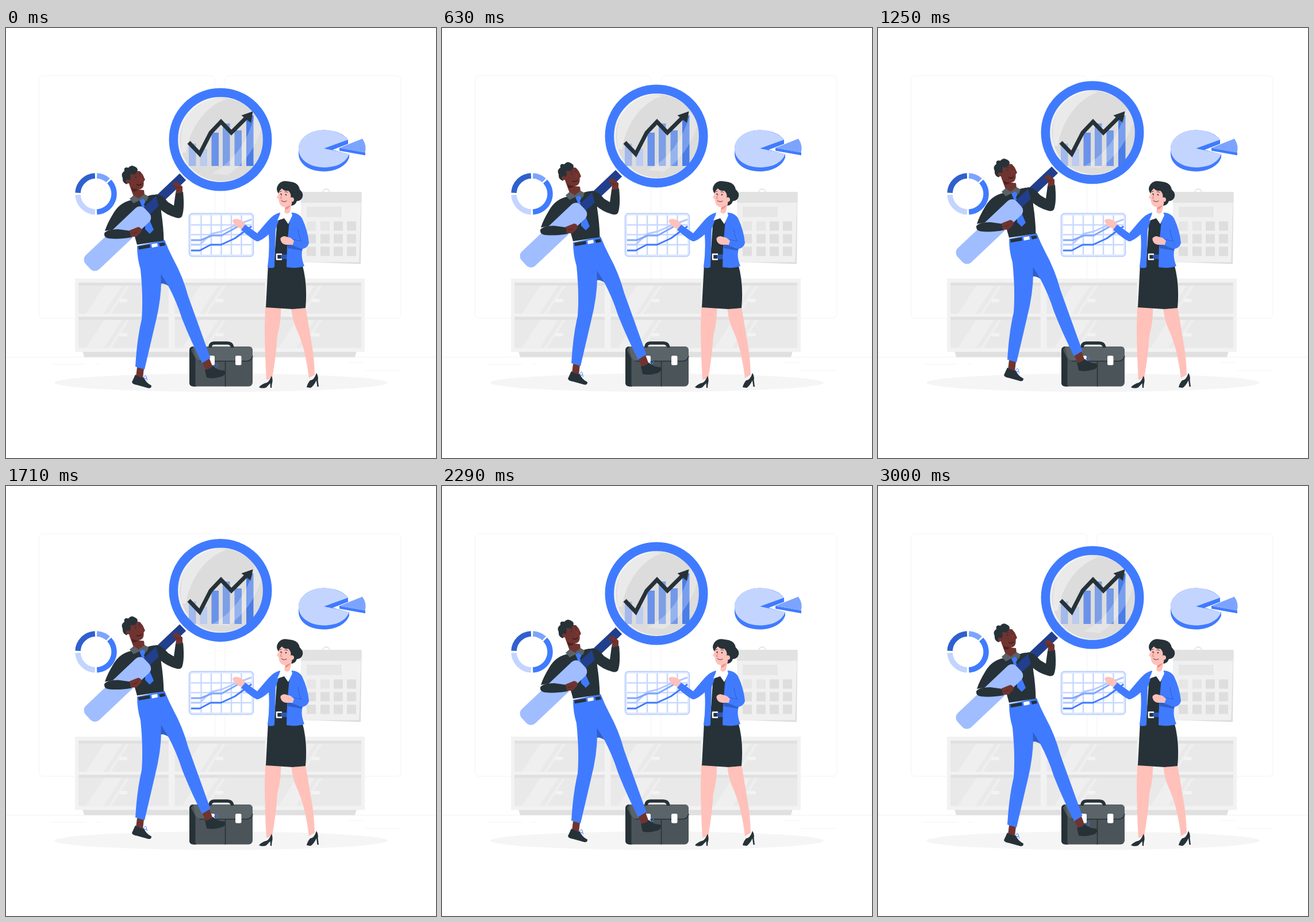
Write an HTML page that moves like this. It is 748 by 748 pixels and loops after 3040 ms.

```html
<!DOCTYPE html>
<html lang="en">
<head>
<meta charset="utf-8">
<title>Business analysis</title>
<style>
html, body { margin: 0; width: 100%; height: 100%; overflow: hidden; background: #fff }
svg { display: block; width: 100vw; height: 100vh }
.blue { fill: #407bff }
.ink { fill: #263238 }
.brown { fill: #6f3430 }
.skin { fill: #ffc1ba }
.line { fill: none; stroke: #263238; stroke-linecap: round }
</style>
</head>
<body>
<svg viewBox="0 0 748 748">
  <defs>
    <clipPath id="lens"><circle cx="373" cy="194" r="75"/></clipPath>
    <g id="drawer">
      <path fill="#e9e9e9" d="M0 0H157V54H0Z"/>
      <path fill="#efefef" d="M45 5H76L44 54H13ZM84 5H89L57 54H52Z"/>
      <path fill="#e0e0e0" d="M0 0H157V5H0Z"/>
      <rect x="71" y="28" width="14" height="6" rx="3" fill="#f3f3f3"/>
    </g>
  </defs>

  <!-- room -->
  <g fill="none" stroke="#f3f3f3">
    <rect x="57.500" y="83" width="306" height="422" rx="7"/>
    <rect x="381" y="83" width="306" height="422" rx="7"/>
    <path stroke="#ededed" stroke-width=".7" d="M0 572.500H748M79 585H138M155 585H165M596 582H623M625 596H687"/>
  </g>
  <ellipse cx="374" cy="617" rx="290" ry="16" fill="#f5f5f5"/>
  <path fill="#e0e0e0" d="M133 562H610L607 572.500H136Z"/>
  <path fill="#f2f2f2" d="M120 436H624V563.500H120Z"/>
  <g id="cabinet"></g>

  <!-- calendar -->
  <path fill="#dcdcdc" d="M515 286H618.500L617 410.500 513 407Z"/>
  <path fill="#f0f0f0" d="M513 285H618L614.500 407.500H513Z"/>
  <path fill="#e2e2e2" d="M513 285H618.500V304H513Z"/>
  <path fill="none" stroke="#e0e0e0" stroke-width="1.500" d="M551 286A6 6 0 1 1 563 286"/>
  <path fill="#e6e6e6" d="M523 311H584V329H523Z"/>
  <g id="days"></g>

  <!-- line chart -->
  <rect x="318.500" y="322.500" width="112" height="75" rx="6" fill="#dfe8ff" stroke="#b5cbff" stroke-width="1.500"/>
  <rect x="322" y="326" width="105" height="68" rx="2" fill="#fff"/>
  <path fill="none" stroke="#c8d8ff" stroke-width="2.500" d="M339.500 326V394M357 326V394M374.500 326V394M392 326V394M409.500 326V394M322 342.500H427M322 359.500H427M322 377H427"/>
  <g fill="none" stroke-width="3" stroke-linejoin="round">
    <path stroke="#b3caff" d="M322 377H337L357 358 375 354 400 343 427 333"/>
    <path stroke="#7ea5ff" d="M322 369H339L358 361H375L395 350 412 340"/>
    <path stroke="#407bff" d="M322 387H337L356 377H374L398 366 427 345"/>
  </g>

  <!-- donut -->
  <g id="donut" fill="none" stroke-width="9.500"></g>

  <!-- pie -->
  <g transform="translate(0 .6)">
    <path class="blue" d="M509 210C509 192 528 177 553 177Q583 178 595 194V201L567 211 597 219V225C592 239 575 249 553 249C526 249 509 235 509 218Z"/>
    <path fill="#c3d5ff" d="M553.500 209L595 194C586 183 570 177 553 177C528 177 509 192 509 210S528 242 553 242C576 242 592 233 597 218.500Z"/>
    <path class="blue" d="M553.500 209L595 194V201L568 211.500Z"/>
    <path fill="#fff" d="M569 211.500L596 201V218Z"/>
    <path class="blue" d="M580 208L625 216V221L580 213Z"/>
    <path fill="#7ca4ff" d="M580 208L620 192Q628 204 624.500 216Z"/>
  </g>

  <!-- glass behind the growth chart -->
  <g class="lift">
    <g clip-path="url(#lens)">
      <circle cx="373" cy="194" r="75" fill="#f0f0f0"/>
      <circle cx="375" cy="194" r="72.500" fill="#d6d6d6" opacity=".75"/>
      <path fill="#fff" opacity=".4" d="M306 217Q297 160 333 132 358 118 383 124C350 134 320 171 313 217Z"/>
    </g>
  </g>
  <g id="bars"></g>
  <path class="line" stroke-width="7" style="stroke-linecap:butt" d="M318 199L337 219 356 182 374 163 392 182 422 152"/>
  <path class="ink" d="M429.500 145L426 165 409.500 152Z"/>

  <!-- briefcase -->
  <rect x="319" y="554" width="110" height="69.500" rx="7" fill="#4b5458"/>
  <path class="ink" d="M326 554Q319 554 319 561V617Q319 623.500 326 623.500H332Q329 623 329.500 617V575L322 560Z"/>
  <path fill="#5b6468" d="M326 554H422Q429 554 429 561V569Q428 578 419 579H339Q331 578 329 570Z"/>
  <path class="line" stroke-width="1.500" d="M337 579.500H419Q427 579 429 571M381.500 580V623"/>
  <path class="line" stroke-width="5.500" style="stroke-linecap:butt" d="M355 556Q355 548 363 548H385Q393 548 394 556"/>
  <rect x="353" y="570" width="10" height="16.500" rx="2.500" fill="#fff"/>
  <rect x="399" y="570" width="10.500" height="16.500" rx="2.500" fill="#fff"/>

  <!-- man with the magnifier -->
  <g class="lift">
    <path fill="#fff" opacity=".25" clip-path="url(#lens)" d="M433 152Q441 162 444 176 428 226 386 256L358 253Q412 225 433 152Z"/>
    <circle cx="373" cy="194" r="81.700" fill="none" stroke="#407bff" stroke-width="15.600"/>

    <path class="brown" d="M228 590L240 592 238 609 226 607ZM341 581L354 575 360 591 348 596Z"/>
    <path class="ink" d="M225 603L219 616Q220 620 228 621L246 626Q253 628 253 622 243 617 240 608 232 608 225 603ZM346 594L349 608Q360 611 376 606 384 602 380 596 366 595 360 588 353 595 346 594Z"/>
    <path fill="none" stroke="#407bff" d="M239 609Q242 602 244 606T240 611Q247 607 245 613M362 589Q364 581 367 585T364 591"/>

    <path class="blue" d="M228 379L276 369Q283 387 291 402 308 433 317 467L355.500 574 341 583Q320 541 306 505 297 476 281 446L270 432Q271 470 259 517L241 594 225 589Q228 540 236 507 239 470 234 420 228 400 228 379Z"/>
    <path fill="#2f5fc8" d="M269.500 428L283 449Q274 443 269.500 445Z"/>
    <path class="ink" d="M215 300L247 292Q262 287 269 294L270 320Q274 346 274.500 370L228 377 221 352 190 350 172 353Q176 340 187 322 197 305 215 300Z"/>
    <path class="ink" d="M230 380L250 376.500 251 382 231 385.500ZM266 374.500L275.500 373 277 378 268 380Z"/>
    <path fill="#fff" d="M253 376L263 374.300 264 380 254 382Z"/>

    <path class="brown" d="M210 257Q220 247 233 249L238 255 242 264 239.500 267Q241 280 231 281L240 282 241 290 230 298 222 293 215 274Z"/>
    <path fill="#4f211f" d="M218 278Q224 281 230 281 225 286 220 284Z"/>
    <path class="ink" d="M210 272Q202 269 203 261 199 253 206 249 204 241 213 243 218 237 224 241 231 244 228 250 224 256 216 254 218 263 214 267Z"/>
    <circle class="brown" cx="212" cy="267" r="3.500"/>
    <path class="ink" d="M224.500 259.500a1 1.600 0 1 0 2 0a1 1.600 0 1 0-2 0M232 258a1 1.600 0 1 0 2 0a1 1.600 0 1 0-2 0"/>
    <path class="line" d="M222 256Q224 253 227 255M231 254L234 253"/>
    <path fill="none" stroke="#9c2c28" stroke-width="1.300" d="M232 258L236 264 232 265"/>
    <path fill="none" stroke="#321210" stroke-width="1.200" d="M227 272Q232 275 236 271"/>
    <path fill="#596267" d="M215 297L222 291 231 297 241 289 248 293 245 301 236 298 222 305Z"/>
    <path class="blue" d="M232 300L238 297 243 301 240 307 248 330 257 351 250 358 242 350 241 325 235 307Z"/>

    <g transform="translate(373 197)rotate(136.600)">
      <rect x="90" y="-8" width="92" height="16" fill="#213f8c"/>
      <rect x="176" y="-17" width="141" height="34" rx="11" fill="#a0bdff"/>
    </g>
    <path fill="none" stroke="#407bff" stroke-width="15.600" d="M320 256A81.700 81.700 0 0 1 306.500 241.500"/>

    <path class="ink" d="M171 357Q176 350 195 350L217 353 219 364Q196 368 179 366 170 365 171 357Z"/>
    <path class="brown" d="M215 352L230 346Q238 348 235 355L227 363 217 363Z"/>
    <path class="ink" d="M260 289Q271 289 282 303L292 309 295 287 308 285Q311 315 306 328 303 332 296 330 278 325 267 314Z"/>
    <path class="brown" d="M295 288L296 280 290 274Q291 267 298 268L307 276 307 286Z"/>
    <path fill="none" stroke="#4f211f" stroke-width=".8" d="M292 274L298 278 302 277M219 358L228 355"/>
  </g>

  <!-- woman -->
  <path class="skin" d="M451 484H478Q479 510 472 535 470 570 463 609L453 612Q450 560 450 520ZM496 485H521Q527 520 531 545 536 570 537 603L527 609Q521 560 508 530 498 510 496 485Z"/>
  <path class="ink" d="M462 605Q465 612 462.500 620L462 626H460L459.500 618 453 625Q447 628 440 625 443 621 450 618 457 618 462 605ZM540 600Q544 606 542.500 612L544 624H541.500L540 613Q535 623 530 626L523 625Q524 619 529 613 536 613 540 600Z"/>
  <path class="ink" d="M456 410H515Q525 445 521 487L498 489 452 486Z"/>
  <path class="ink" d="M472 328L497 325 493 415H466Z"/>
  <path fill="#2e57b3" d="M478 394H490V402H478Z"/>
  <path fill="none" stroke="#fff" stroke-width="2.500" stroke-linejoin="round" d="M480 393.500H471V402.500H480"/>
  <path class="skin" d="M395 338Q392 332 401 332 411 333 416 341L411 350Q399 346 395 338Z"/>
  <path class="blue" d="M477 321Q466 323 455 336L437 357 416 342 409 351Q427 367 436 371 442 372 457 359 459 388 455 416 461 419 467 416L469 350 475 333ZM495 321Q509 321 515 331 525 352 527 374 525 382 516 384 512 397 519 414 506 419 488 416L489 380 492 345Z"/>
  <path fill="#2f5fc8" d="M489 376L501 379 516 384 514 387 490 383Z"/>
  <path class="blue" d="M499 368L512 370 524 379Q519 386 510 383L498 378Z"/>
  <path fill="none" stroke="#2f5fc8" d="M508 350Q509 363 514 371L500 368"/>
  <path class="skin" d="M478 370Q475 364 484 362L495 365 501 370 499 377H487Q480 376 478 370Z"/>
  <path fill="#fff" d="M480 316L472 335 484 331 491 341 498 326 495 316Z"/>
  <path class="skin" d="M477 278L474 289 471 295 474.500 298Q475 311 486 312L484 320Q489 326 494 320L497 305 505 290 495 276Z"/>
  <path fill="#f09088" d="M486 312L495 308Q492 315 485 316Z"/>
  <path class="ink" d="M474 288Q468 280 474 272 480 264 492 267 509 268 511 281 519 288 515 296 512 301 506 301 503 309 496 309 499 303 495 296 497 288 491 283 483 284 480 279 476 282 474 288Z"/>
  <circle class="skin" cx="497" cy="298.500" r="4"/>
  <g class="ink"><circle cx="478.500" cy="289" r="1.200"/><circle cx="487" cy="290" r="1.200"/></g>
  <path class="line" stroke-width=".9" d="M476 285L479 284M485 285Q488 284 490 286M479 300Q483 304 488 301"/>
  <path fill="none" stroke="#e46f68" d="M480 290L477.500 296 480 297"/>
</svg>
<script>
const $ = id => document.getElementById(id);
const rect = (x, y, w, h, fill) => `<rect x="${x}" y="${y}" width="${w}" height="${h}" fill="${fill}"/>`;

for (const x of [126, 293.5, 461])
  for (const y of [443, 502.5])
    $("cabinet").innerHTML += `<use href="#drawer" x="${x}" y="${y}"/>`;

for (let row = 0; row < 3; row++)
  for (let col = 0; col < 4; col++)
    $("days").innerHTML += rect([523, 547, 570, 593][col], 336.5 + row * 22, 16, 16,
      row == 0 && col < 2 ? "#e6e6e6" : "#dedede");

// Each bar: left edge, top, colour
[[318, 201, "#a3b9ec"], [337.5, 210, "#bccbf0"], [357.5, 182, "#6a92ea"],
 [377, 166, "#7d9fe6"], [397.5, 178, "#7199e8"], [418, 152, "#4a7de8"]]
  .forEach(([x, y, fill]) => $("bars").innerHTML += rect(x, y, 12.5, 240 - y, fill));

const point = deg => {
  const a = deg * Math.PI / 180;
  return `${156.5 + 31.5 * Math.cos(a)} ${288.5 + 31.5 * Math.sin(a)}`;
};
// Each ring part: start and end angle, colour
[[-177, -93, "#2f60cf"], [-87, -48, "#7ca4ff"], [-43, 87, "#407bff"], [93, 177, "#c3d5ff"]]
  .forEach(([from, to, colour]) => $("donut").innerHTML +=
    `<path stroke="${colour}" d="M${point(from)}A31.5 31.5 0 0 1 ${point(to)}"/>`);

const lifted = document.querySelectorAll(".lift");
const start = performance.now();
function draw(now) {
  const t = Math.max(0, now - start) % 3040;
  const rise = 14.6 * Math.max(0, 1 - Math.abs(t - 1505) / 1500);
  lifted.forEach(g => g.setAttribute("transform", `translate(0 ${-rise})`));
  requestAnimationFrame(draw);
}
draw(start);
</script>
</body>
</html>
```
